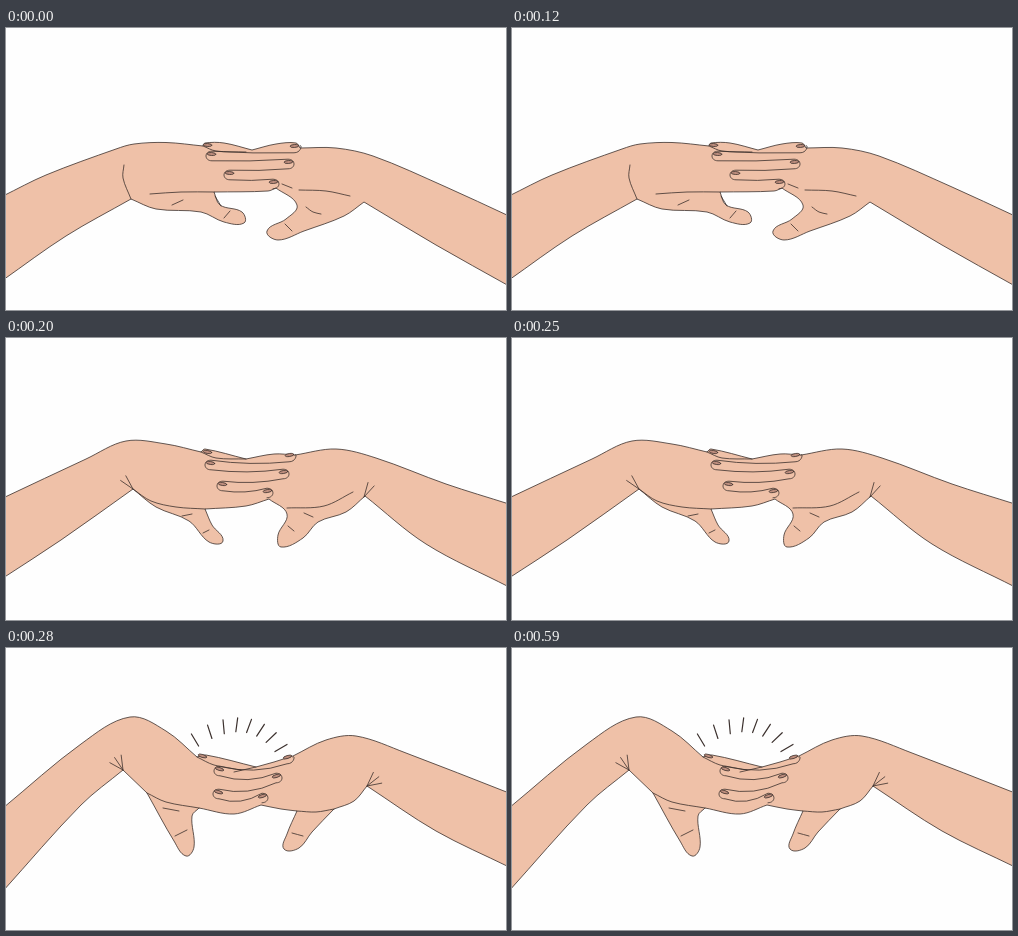
An HTML page with a canvas for the animation above (0.8 s loop, 500 by 282 pixels).

```html
<!DOCTYPE html>
<html lang="en">
<head>
<meta charset="utf-8">
<title>Stretching hands</title>
<style>
html, body { margin: 0; width: 100%; height: 100%; overflow: hidden; background: #fefefe; }
canvas { display: block; width: 100vw; height: 100vh; }
</style>
</head>
<body>
<canvas id="stage"></canvas>
<script>
const W = 500, H = 282, LOOP = 800;
const PAPER = '#fefefe', SKIN = '#efc1a8', INK = '#3b302d', NAIL = '#bd8d7d';
const canvas = document.getElementById('stage');
const ctx = canvas.getContext('2d');
const rad = deg => deg * Math.PI / 180;

// body: smooth runs that meet at corners; bend: finger curl in degrees;
// tips: fingertips from the top, alternately pointing left and right;
// folds: wrist creases as x, y, direction, count.
const poses = [
  {
    start: 0,
    bend: 3,
    body: [
      '-3,168 40,147 110,121 128,116 160,114.5 197,118', '199,115 218,115 246,122', '270,116 290,115 294,120',
      '330,120 367,128 440,159 503,188', '503,258', '430,217 358,174',
      '338,188 298,203 272,212 261,203 280,191 291,177 270,160', '262,163 208,164',
      '214,177 236,184 238,195 218,194 195,184 150,181 125,171', '60,208 -3,252'
    ],
    tips: '196,119 294,120 200,128 288,136 218,147 273,156',
    lines: [
      '197,118 210,123 240,124', '118,137 117,150 125,171', '144,166 175,164 208,164',
      '166,177 177,172', '218,190 224,183', '209,168 215,178', '293,162 320,163 344,168',
      '276,156 286,160', '300,179 307,184 315,186', '279,196 286,203'
    ],
    folds: []
  },
  {
    start: 200,
    bend: 8,
    body: [
      '-3,160 80,121 120,103 160,106 195,114', '199,111 240,121', '268,116 289,117',
      '330,111 370,120 440,146 503,166', '503,249', '420,206 359,158',
      '340,174 312,184 297,200 275,209 272,197 281,176 263,161', '240,168 199,171',
      '206,187 217,203 203,204 183,183 150,169 127,151', '55,202 -3,240'
    ],
    tips: '196,116 289,119 199,127 283,136 211,148 267,155',
    lines: [
      '195,114 210,120 240,121', '127,151 145,163 170,169 199,171', '281,170 318,168 347,154',
      '176,178 186,176', '197,195 203,192', '298,175 307,179', '282,188 288,193'
    ],
    folds: [[127, 151, -132, 2], [358, 159, -61, 2]]
  },
  {
    start: 280,
    bend: 17,
    body: [
      '-3,160 75,96 124,69 160,83 191,109', '200,107 250,119', '268,114 287,108',
      '320,92 350,88 400,105 503,145', '503,219', '430,183 361,138', '348,153 328,161',
      '306,184 293,200 278,201 281,186 291,163', '275,161 255,157', '228,166 193,160',
      '186,168 188,199 180,208 168,193 141,145', '117,122', '75,157 -3,243'
    ],
    tips: '191,110 287,111 208,123 276,130 207,146 262,150',
    lines: [
      '191,109 208,117 235,122', '228,124 250,119', '141,145 160,154 193,160', '291,163 310,164 328,161',
      '157,160 173,163', '169,188 181,182', '286,185 297,188'
    ],
    folds: [[117, 122, -124, 3], [361, 138, -38, 3]],
    rays: 8
  }
];

const points = text => text.split(' ').map(s => s.split(',').map(Number));

// Smooth curve: tangents follow the neighbours, handles follow the span.
function curve(p) {
  const dir = i => {
    const a = p[Math.max(i - 1, 0)], b = p[Math.min(i + 1, p.length - 1)];
    const d = Math.hypot(b[0] - a[0], b[1] - a[1]);
    return [(b[0] - a[0]) / d, (b[1] - a[1]) / d];
  };
  for (let i = 1; i < p.length; i++) {
    const [ax, ay] = p[i - 1], [bx, by] = p[i];
    const [ux, uy] = dir(i - 1), [vx, vy] = dir(i);
    const k = Math.hypot(bx - ax, by - ay) / 3;
    ctx.bezierCurveTo(ax + ux * k, ay + uy * k, bx - vx * k, by - vy * k, bx, by);
  }
}

function drawBody(runs) {
  let end;
  ctx.beginPath();
  for (const run of runs) {
    const p = points(run);
    if (end) p.unshift(end); else ctx.moveTo(...p[0]);
    curve(p);
    end = p.at(-1);
  }
  ctx.closePath();
  ctx.fillStyle = SKIN;
  ctx.fill();
  ctx.stroke();
}

function drawLine(text) {
  const p = points(text);
  ctx.beginPath();
  ctx.moveTo(...p[0]);
  curve(p);
  ctx.stroke();
}

// A stroke centred on x, y, or starting there when back is 0.
function dash(x, y, deg, length, back = length) {
  const c = Math.cos(rad(deg)), s = Math.sin(rad(deg));
  ctx.beginPath();
  ctx.moveTo(x - c * back, y - s * back);
  ctx.lineTo(x + c * length, y + s * length);
  ctx.stroke();
}

function drawFolds([x, y, deg, count]) {
  for (let i = 0; i < count; i++) dash(x, y, deg + (i - (count - 1) / 2) * 27, 15, 0);
}

// One winding line separates the laced fingers, turning round each tip.
function drawFingers(tips, bend) {
  const inset = 6, r = 4.8, sag = bend * 0.6;
  let last;
  ctx.beginPath();
  tips.forEach(([x, y], i) => {
    if (i === 0) return;
    const side = i % 2 ? -1 : 1;
    const inner = x + side * inset, outer = x - side * 2;
    if (last) ctx.quadraticCurveTo((last[0] + inner) / 2, (last[1] + y - r) / 2 + sag, inner, y - r);
    else ctx.moveTo(x, y - 2);
    ctx.bezierCurveTo(outer, y - r, outer, y + r, inner, y + r);
    last = [inner, y + r];
  });
  ctx.stroke();

  ctx.fillStyle = NAIL;
  tips.forEach(([x, y], i) => {
    const side = i % 2 ? -1 : 1;
    ctx.beginPath();
    ctx.ellipse(x + side * 5.5, y - 2, 4.4, 1.5, rad(side * bend), 0, Math.PI * 2);
    ctx.fill();
    ctx.stroke();
  });
}

function drawRays(count) {
  ctx.lineWidth = 1.2;
  for (let i = 0; i < count; i++) {
    const u = 2 * i / (count - 1) - 1;
    dash(232 + 43 * u + 5 * (1 - u * u), 77 + 4 * u + 19 * u * u, 45 * u - 76, 7);
  }
}

function draw(pose) {
  const w = Math.round(innerWidth * devicePixelRatio);
  const h = Math.round(innerHeight * devicePixelRatio);
  if (canvas.width !== w || canvas.height !== h) {
    canvas.width = w;
    canvas.height = h;
  }
  ctx.setTransform(w / W, 0, 0, h / H, 0, 0);
  ctx.fillStyle = PAPER;
  ctx.fillRect(0, 0, W, H);
  ctx.lineCap = ctx.lineJoin = 'round';
  ctx.strokeStyle = INK;
  ctx.lineWidth = 0.8;

  drawBody(pose.body);
  pose.lines.forEach(drawLine);
  pose.folds.forEach(drawFolds);
  drawFingers(points(pose.tips), pose.bend);
  if (pose.rays) drawRays(pose.rays);
}

const origin = performance.now();
function tick() {
  const t = (performance.now() - origin) % LOOP;
  draw(poses.findLast(p => t >= p.start));
  requestAnimationFrame(tick);
}
tick();
</script>
</body>
</html>
```
